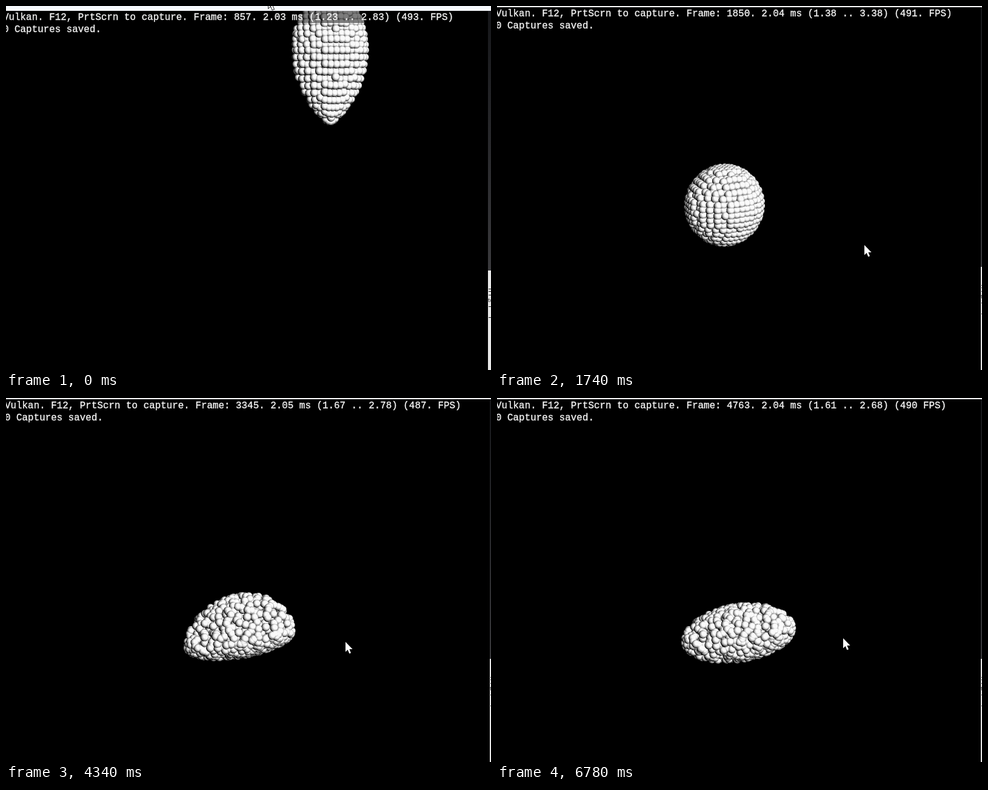
These frames come from a looping animation (800x600 px, 6.88 s). An HTML page with a canvas:

```html
<!DOCTYPE html>
<html lang="en">
<head>
<meta charset="utf-8">
<title>Falling particle ball</title>
<style>
html, body { margin: 0; width: 100%; height: 100%; overflow: hidden; background: #000; }
canvas { display: block; }
</style>
</head>
<body>
<canvas id="stage" width="800" height="600"></canvas>
<script>
const ctx = document.getElementById('stage').getContext('2d');
const LOOP = 6880, LAST = 6780, UPDATE = 26.5, REFRESH = 845;

// Frame counter readings: [time, count]
const CLOCK = [
  [0, 857], [20, 868], [570, 1173], [1740, 1850],
  [2940, 2536], [4340, 3345], [5310, 3907], [LAST, 4763]
];

// One line of statistics per refresh
const STATS = [
  '2.03 ms (1.23 .. 2.83) (493. FPS)',
  '2.04 ms (1.31 .. 3.02) (490. FPS)',
  '2.04 ms (1.38 .. 3.38) (491. FPS)',
  '2.05 ms (1.67 .. 2.81) (487. FPS)',
  '2.04 ms (1.64 .. 2.75) (489 FPS)',
  '2.05 ms (1.67 .. 2.78) (487. FPS)',
  '2.04 ms (1.67 .. 2.62) (490. FPS)',
  '2.05 ms (1.63 .. 2.71) (488. FPS)',
  '2.04 ms (1.61 .. 2.68) (490 FPS)'
];

const ramp = (t, from, to) => Math.min(1, Math.max(0, (t - from) / (to - from)));
const smooth = (t, from, to) => {
  const u = ramp(t, from, to);
  return u * u * (3 - 2 * u);
};

// Advances in whole picture updates between two clock readings.
function tick(t) {
  let i = 0;
  while (i < CLOCK.length - 2 && t >= CLOCK[i + 1][0]) i++;
  const [t0, c0] = CLOCK[i], [t1, c1] = CLOCK[i + 1];
  const steps = Math.max(1, Math.round((t1 - t0) / UPDATE));
  const u = Math.floor(ramp(t, t0, t1) * steps + 1e-6) / steps;
  return { time: t0 + (t1 - t0) * u, count: Math.round(c0 + (c1 - c0) * u) };
}

// The ball drops, lands, slumps into a mound and is viewed from a tilting camera.
function pose(t) {
  const drag = smooth(t, 570, 1350);
  const land = smooth(t, 1400, 2900);
  const spread = smooth(t, 2900, 3700);
  const slump = ramp(t, 2900, 6300);
  const raise = smooth(t, 5550, 6260);
  const tilt = smooth(t, 4340, 4860) - raise;
  const fall = Math.pow(Math.min(t, 1350) / 570, 1.36);
  return {
    cx: 537 - 162 * drag + 23 * slump,
    cy: 67 + 78 * fall + 72 * land + 7 * (spread - raise) + 28 * tilt,
    half: 64 + 17 * land + 9 * spread + 4 * slump,
    up: 100 - 35 * drag + 30 * land - 41 * slump + 4 * tilt,
    down: 126 - 50 * drag - 52 * land + 23 * slump + 20 * tilt,
    shear: .03 * raise - .15 * land,
    taper: .32 * (1 - drag),
    turn: .43 * drag,
    pitch: -.79 + 1.05 * drag + .18 * land + .12 * tilt,
    sway: .16 * (1 - drag),
    mess: .7 * ramp(t, 1500, 4600)
  };
}

let seed = 7;
const random = () => (seed = seed * 16807 % 2147483647) / 2147483647;
const jitter = () => random() * 2 - 1;

const CELLS = 7.2, balls = [];
for (let x = -7; x <= 7; x++)
  for (let y = -7; y <= 7; y++)
    for (let z = -7; z <= 7; z++)
      if (x * x + y * y + z * z < 59)
        balls.push({ at: [x, y, z], off: [jitter(), jitter(), jitter()] });

// Depth-buffered sphere renderer at double resolution
const SS = 2, LEFT = 275, W = 345 * SS, H = 500 * SS, RADIUS = 6, DEPTH = 58;
const layer = document.createElement('canvas');
layer.width = W;
layer.height = H;
const layerCtx = layer.getContext('2d');
const image = layerCtx.createImageData(W, H);
const pixels = new Uint32Array(image.data.buffer);
const depth = new Float32Array(W * H);

function sphere(cx, cy, cz, r) {
  const x0 = Math.max(0, Math.floor(cx - r)), x1 = Math.min(W - 1, Math.ceil(cx + r));
  const y0 = Math.max(0, Math.floor(cy - r)), y1 = Math.min(H - 1, Math.ceil(cy + r));
  for (let y = y0; y <= y1; y++) {
    const ny = (y + .5 - cy) / r;
    for (let x = x0; x <= x1; x++) {
      const nx = (x + .5 - cx) / r, d = nx * nx + ny * ny;
      if (d >= 1) continue;
      const nz = Math.sqrt(1 - d), z = cz + nz * r, i = y * W + x;
      if (z <= depth[i]) continue;
      depth[i] = z;
      const light = 1.18 * (.33 * nx - .25 * ny + .91 * nz);
      const v = Math.round(250 * Math.min(1, Math.max(0, light)));
      pixels[i] = (255 << 24 | v << 16 | v << 8 | v) >>> 0;
    }
  }
}

const rotate = (a, b, angle) => {
  const s = Math.sin(angle), c = Math.cos(angle);
  return [a * c + b * s, b * c - a * s];
};

function drawBody(t) {
  const p = pose(t);
  pixels.fill(0);
  depth.fill(-1e4);
  for (const { at, off } of balls) {
    let [x, y, z] = at.map((v, i) => (v + off[i] * p.mess) / CELLS);
    const size = Math.max(1, Math.hypot(x, y, z));
    [x, z] = rotate(x / size, z / size, p.turn);
    [y, z] = rotate(y / size, z, p.pitch);
    [x, z] = rotate(x, z, p.sway);
    const near = 1 + .17 * z;
    if (y > 0) x *= Math.pow(1 - Math.min(1, y * y), p.taper);
    const dx = x * near * (p.half - RADIUS);
    const dy = y * ((y < 0 ? p.up : p.down) - RADIUS) + p.shear * dx;
    sphere((p.cx + dx - LEFT) * SS, (p.cy + dy) * SS, z * DEPTH * SS, RADIUS * near * SS);
  }
  layerCtx.putImageData(image, 0, 0);
  ctx.save();
  ctx.beginPath();
  ctx.rect(-10, 2, 808, 610);
  ctx.clip();
  ctx.drawImage(layer, LEFT, 0, W / SS, H / SS);
  ctx.restore();
}

function box(color, x, y, w, h) {
  ctx.fillStyle = color;
  ctx.fillRect(x, y, w, h);
}

function drawSurround() {
  box('#f6f8fc', -10, -10, 820, 12);
  const shade = ctx.createLinearGradient(0, 2, 0, 430);
  shade.addColorStop(0, '#16171a');
  shade.addColorStop(1, '#3a3a3d');
  box(shade, 798, 2, 12, 428);
  box('#e8e8e8', 798, 430, 12, 180);
  for (const y of [460, 464, 470, 489, 507]) box('#222', 799, y, 11, 1);
  ctx.fillStyle = '#222';
  ctx.font = '9px "Noto Sans", sans-serif';
  ctx.fillText('to', 798, 482);
}

function drawText(lines) {
  ctx.font = '15.88px "Liberation Mono", monospace';
  ctx.lineWidth = .4;
  lines.forEach((line, i) => {
    box('rgba(0,0,0,.5)', -2, 2 + 20 * i, ctx.measureText(line).width, 20);
    ctx.fillStyle = ctx.strokeStyle = '#f0f0f0';
    ctx.fillText(line, -2, 17 + 20 * i);
    ctx.strokeText(line, -2, 17 + 20 * i);
  });
}

const arrow = new Path2D('M0 0V16.5L3.7 13L6.3 19.3L9 18.2L6.4 12H11.6Z');

function drawPointer(t) {
  const enter = smooth(t, 0, 570), drag = smooth(t, 570, 1350);
  const pull = smooth(t, 3560, 4170), tilt = smooth(t, 4340, 4860);
  const raise = smooth(t, 5550, 6260);
  ctx.save();
  ctx.translate(
    436 + 154 * enter + 16 * drag - 46 * pull + 11 * raise,
    -19 + 181 * enter + 232 * drag + 8 * pull + 26 * tilt - 32 * raise
  );
  ctx.lineWidth = 1.6;
  ctx.strokeStyle = '#000';
  ctx.stroke(arrow);
  ctx.fillStyle = '#fff';
  ctx.fill(arrow);
  ctx.restore();
}

function draw(t) {
  const { time, count } = tick(t);
  const stats = STATS[Math.max(0, Math.floor((time - 5) / REFRESH))];
  const shift = 1 - smooth(time, 0, 400);
  box('#000', 0, 0, 800, 600);
  ctx.save();
  ctx.translate(Math.round(-3 * shift), Math.round(6 * shift));
  drawBody(time);
  drawText([
    `Vulkan. F12, PrtScrn to capture. Frame: ${count}. ${stats}`,
    '0 Captures saved.'
  ]);
  drawSurround();
  drawPointer(time);
  ctx.restore();
}

const start = performance.now();
function loop() {
  draw((performance.now() - start) % LOOP);
  requestAnimationFrame(loop);
}
loop();
</script>
</body>
</html>
```
